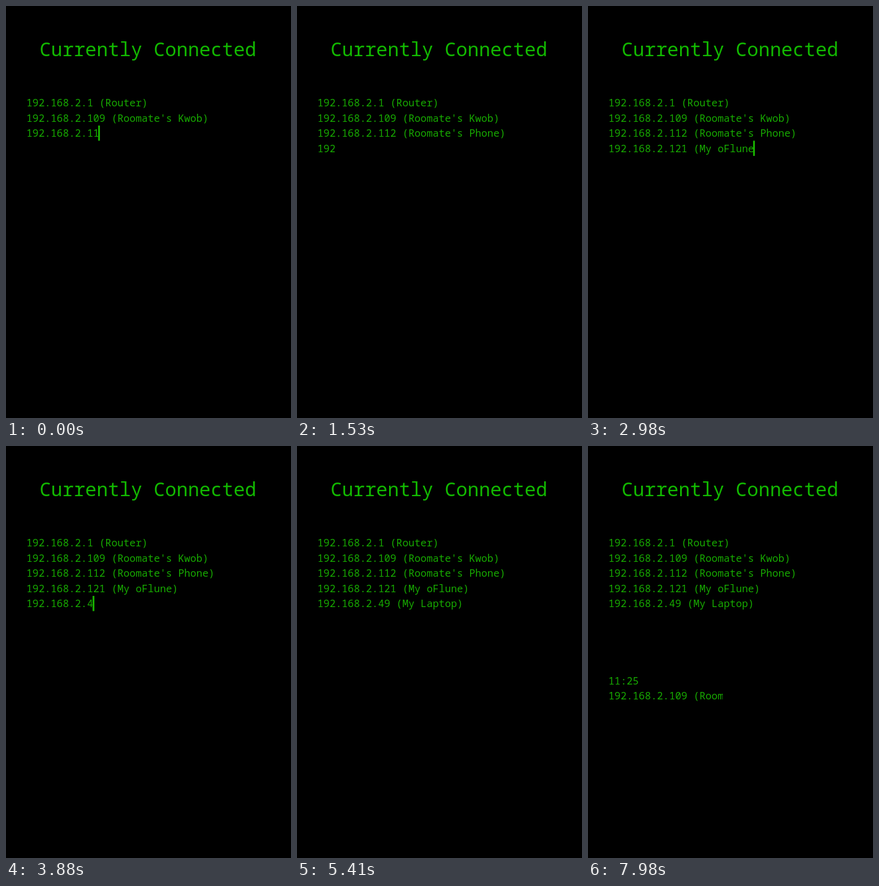
Recreate the animation shown at these times as an HTML page with a canvas. Size 461 px wide and 665 px high, loop 8 s.

```html
<!DOCTYPE html>
<html lang="en">
<head>
<meta charset="utf-8">
<title>Currently Connected</title>
<style>
html, body { margin: 0; width: 100%; height: 100%; overflow: hidden; background: #000; }
canvas { display: block; }
</style>
</head>
<body>
<canvas id="stage" width="461" height="665"></canvas>
<script>
const ctx = document.getElementById('stage').getContext('2d');
const LOOP = 8000;
const FONT = '"Noto Sans Mono", "DejaVu Sans Mono", monospace';
const GREEN = '#17aa00';
const LEFT = 33.7, PITCH = 9.82, ROW = 24.5, FULL = 40, CARET = 3;

// y: middle of the row; start and step in ms; chars: typed width in cells;
// stay: the caret keeps blinking after typing; period and on: caret blink
const rows = [
  { text: '192.168.2.1 (Router)', y: 156.2, start: -9000, step: 69 },
  { text: "192.168.2.109 (Roomate's Kwob)", y: 180.7, start: -9000, step: 69 },
  { text: "192.168.2.112 (Roomate's Phone)", y: 205.2, start: -832, step: 69 },
  { text: '192.168.2.121 (My oFlune)', y: 229.7, start: 1320, step: 69 },
  { text: '192.168.2.49 (My Laptop)', y: 254.2, start: 3068, step: 69 },
  { text: '11:25', y: 378.8, start: 5470, step: 5, chars: FULL, stay: true,
    blinkFrom: 5670, period: 750, on: 375 },
  { text: "192.168.2.109 (Roomate's Kwob)", y: 403.5, start: 5670, step: 118,
    chars: FULL, stay: true, period: 750, on: 375 }
];

function drawText(text, x, baseline, size, color) {
  ctx.font = `300 ${size}px ${FONT}`;
  ctx.fillStyle = color;
  ctx.fillText(text, x, baseline);
}

function caretShown(row, t) {
  const { period = 1000, on = 400, blinkFrom = row.start } = row;
  return t >= blinkFrom && (t - blinkFrom) % period >= on;
}

function drawRow(row, t) {
  if (t < row.start) return;
  const total = row.chars || row.text.length;
  const count = Math.min(total, Math.floor((t - row.start) / row.step));
  const typing = count < total;
  const right = LEFT + count * PITCH + 0.8;
  const top = row.y - ROW / 2;

  ctx.save();
  if (typing) {
    ctx.beginPath();
    ctx.rect(0, top, Math.max(0, right - CARET), ROW);
    ctx.clip();
  }
  drawText(row.text, LEFT - 0.7, row.y + 5.8, PITCH / 0.6, GREEN);
  ctx.restore();

  if ((typing || row.stay) && caretShown(row, t)) {
    ctx.fillStyle = GREEN;
    ctx.fillRect(Math.round(right - CARET), top, CARET, ROW);
  }
}

function draw(t) {
  ctx.fillStyle = '#000';
  ctx.fillRect(0, 0, 461, 665);
  drawText('Currently Connected', 54.3, 81, 30.75, '#12b900');
  for (const row of rows) drawRow(row, t);
}

const begin = performance.now();
function tick() {
  draw((performance.now() - begin) % LOOP);
  requestAnimationFrame(tick);
}
tick();
</script>
</body>
</html>
```
